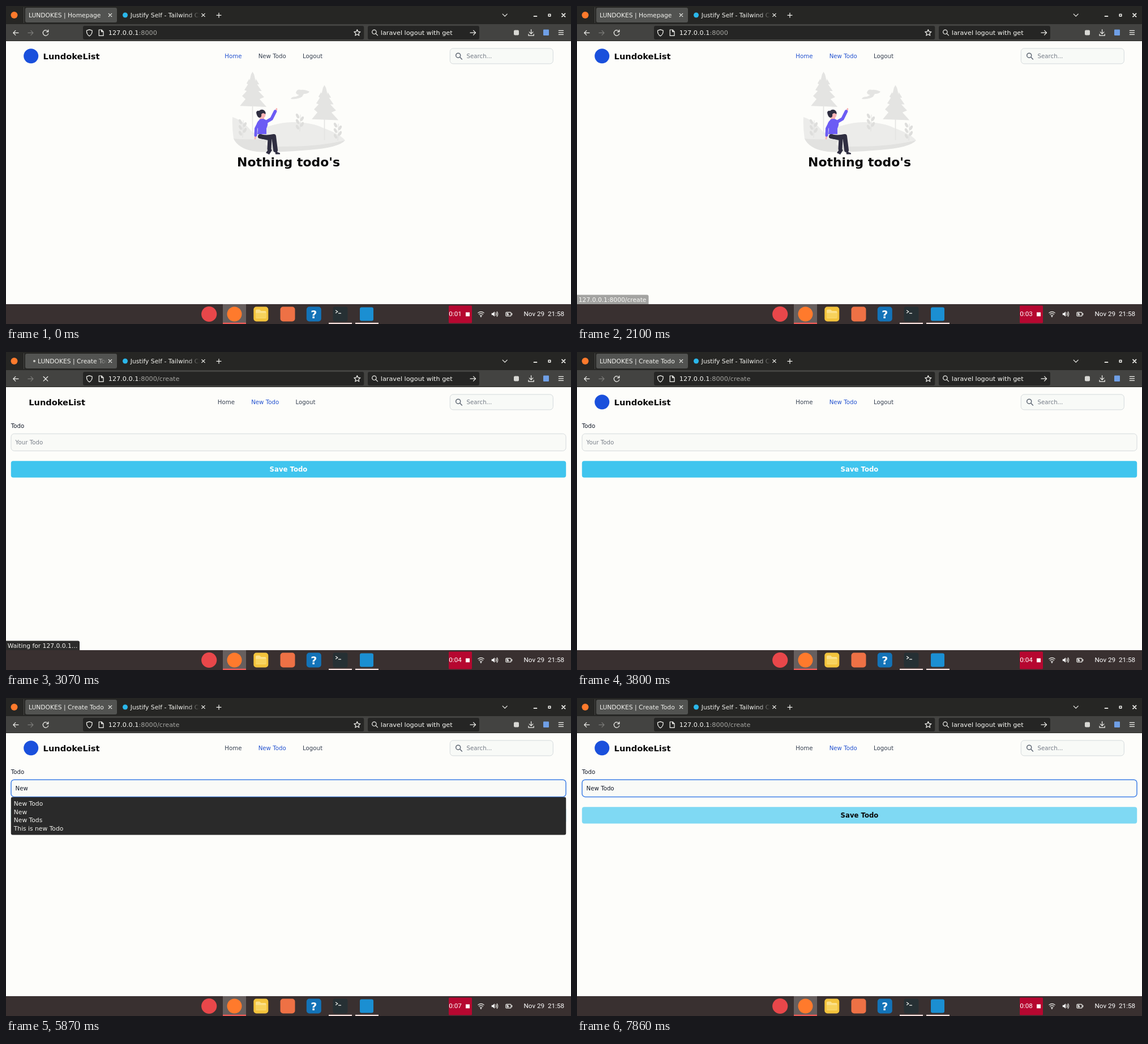
Write an HTML page that moves like this. It is 998 by 561 pixels and loops after 8000 ms.

```html
<!DOCTYPE html>
<html lang="en">
<head>
<meta charset="utf-8">
<title>Todo screencast</title>
<style>
html, body { margin: 0; width: 100%; height: 100%; overflow: hidden; background: #fdfdfa; }
svg { display: block; width: 100%; height: 100%; }
text { font-family: "DejaVu Sans", sans-serif; white-space: pre; }
.panel { font-family: Roboto, sans-serif; font-size: 11.7px; fill: #fff; }
.line { fill: none; stroke: #f4f4f0; stroke-width: 1.2; stroke-linecap: round; stroke-linejoin: round; }
.tab { font-size: 10.72px; fill: #f2f2ee; }
.bar { font-size: 11.25px; fill: #f8f8f4; }
.page { font-size: 10.23px; fill: #374151; }
.bold { font-weight: bold; fill: #080808; }
</style>
</head>
<body>
<svg viewBox="0 0 998 561" preserveAspectRatio="none">
  <defs>
    <linearGradient id="fadeTab"><stop stop-color="#525351" stop-opacity="0"/><stop offset="1" stop-color="#525351"/></linearGradient>
    <linearGradient id="fadeBar"><stop stop-color="#262624" stop-opacity="0"/><stop offset="1" stop-color="#262624"/></linearGradient>
    <clipPath id="tabClip"><rect x="36" y="3" width="143" height="26"/></clipPath>
    <clipPath id="tab2Clip"><rect x="200" y="3" width="142" height="26"/></clipPath>
  </defs>

  <rect width="998" height="561" fill="#fdfdfa"/>

  <g id="nav">
    <circle id="logo" cx="44.2" cy="88.3" r="13" fill="#1a50dc"/>
    <text id="brand" class="bold" y="93.7" font-size="14.61">LundokeList</text>
    <g id="links" class="page">
      <text id="home" x="386.3" y="92.1">Home</text>
      <text id="new" x="445.7" y="92.1">New Todo</text>
      <text id="logout" x="524" y="92.1">Logout</text>
    </g>
    <rect x="784.3" y="74.9" width="182" height="27" rx="5.5" fill="#f8faf7" stroke="#d1d6d8" stroke-width=".9"/>
    <g fill="none" stroke="#5d6672" stroke-width="1.5" stroke-linecap="round"><circle cx="798.7" cy="87.2" r="4"/><path d="M801.8 90.3l3.6 3.7"/></g>
    <text class="page" x="813.5" y="92.1" style="fill:#747b86">Search...</text>
  </g>

  <g id="empty">
    <g id="scene"></g>
    <text class="bold" x="499" y="283" font-size="21.92" text-anchor="middle">Nothing todo's</text>
  </g>

  <g id="form">
    <text class="page" x="8.8" y="134.4" style="fill:#111827">Todo</text>
    <rect id="input" x="9" y="144.2" width="980" height="30.2" rx="5.5" fill="#f9faf7"/>
    <text id="value" class="page" x="16.6" y="163"></text>
    <rect id="caret" y="153" width="1" height="13" fill="#111"/>
    <rect id="save" x="8.8" y="192.2" width="980.4" height="29.4" rx="4"/>
    <text id="saveText" class="bold" x="499" y="211.2" font-size="11.69" text-anchor="middle">Save Todo</text>
    <g id="popup">
      <rect x="8.8" y="174.8" width="980.4" height="66.8" rx="3" fill="#2a2a2a"/>
      <rect id="pick" x="9.5" y="178.6" width="979" height="14.7" fill="#545454"/>
      <g id="rows" class="tab"></g>
    </g>
  </g>

  <g id="status">
    <path id="statusBox" fill="#2b2b2a"/>
    <text id="statusText" class="tab" x="2.8" y="521.8"></text>
  </g>

  <g id="chrome">
    <rect width="998" height="32" fill="#262624"/>
    <rect y="32" width="998" height="30" fill="#434341"/>
    <rect y="61" width="998" height="1" fill="#2b2b28"/>
    <path d="M31.5 2V30" stroke="#484846"/>
    <circle cx="14.5" cy="16" r="6" fill="#ff7a2c"/>
    <rect x="34" y="3" width="162" height="26" rx="3" fill="#525351"/>
    <circle id="throbber" cy="16" r="2.1" fill="#c6c6c2"/>
    <g clip-path="url(#tabClip)"><text id="title" class="tab" y="19.8"></text></g>
    <rect id="titleFade" x="158" y="5" width="21" height="22" fill="url(#fadeTab)"/>
    <circle cx="210.5" cy="16" r="4.5" fill="#2ab7ea"/>
    <g clip-path="url(#tab2Clip)"><text class="tab" x="219.8" y="19.8">Justify Self - Tailwind CSS</text></g>
    <rect x="320" y="5" width="22" height="22" fill="url(#fadeBar)"/>
    <g class="line">
      <path d="M181.3 13.3l5.4 5.4m0-5.4l-5.4 5.4M345.8 13.3l5.4 5.4m0-5.4l-5.4 5.4M372 16.3h8m-4-4v8"/>
      <path d="M877.2 14.2l4 4 4-4"/>
      <path d="M932.5 18.2h5M982 13.3l5.6 5.6m0-5.6l-5.6 5.6" stroke-width="1.7"/>
      <rect x="958.2" y="14.4" width="3.6" height="3.6" stroke-width="1.5"/>
      <path d="M22 47.3h-9.2m4-4l-4 4 4 4"/>
      <path d="M38.8 47.3H48m-4-4l4 4-4 4" stroke="#7c7c79"/>
      <path id="reload" d="M74.4 45.3a4.8 4.8 0 1 0 .3 3.6M74.8 42.2v3.4h-3.4"/>
      <path id="stop" d="M66.2 43.5l7.6 7.6m0-7.6l-7.6 7.6"/>
    </g>
    <g fill="#252524"><rect x="136" y="35" width="496.3" height="24" rx="3"/><rect x="639" y="35" width="197" height="24" rx="3"/></g>
    <g class="line" stroke-width="1.1">
      <path d="M147.3 41.6l4.9 1.8c.2 4.7-1.2 7.6-4.9 9.5-3.7-1.9-5.1-4.8-4.9-9.5z"/>
      <path d="M164.2 42h4.6l3.2 3.2v7.2h-7.8zM168.6 42v3.4h3.4"/>
      <path id="star"/>
      <circle cx="650.4" cy="45.8" r="3.7"/><path d="M653.2 48.6l3.3 3.3"/>
      <path d="M820 47.2h9.6m-4-4l4 4-4 4"/>
      <path d="M927.6 41.5v7.6m-3.3-3.2l3.3 3.3 3.3-3.3M923 49.6v2.6h9.2v-2.6"/>
      <path d="M976.3 43.4h8.2m-8.2 3.5h8.2m-8.2 3.5h8.2"/>
    </g>
    <rect x="897" y="42.5" width="9" height="9" rx="2" fill="#d8d8d4"/>
    <rect x="949" y="41.5" width="10" height="10.5" rx="1" fill="#6f9fe6"/>
    <text class="bar" x="180.8" y="51.2">127.0.0.1<tspan id="path" fill="#a6a6a2"></tspan></text>
    <text class="bar" x="661.8" y="51.2">laravel logout with get</text>
  </g>

  <g id="dock">
    <rect y="526" width="998" height="35" fill="#393030"/>
    <rect x="383" y="526" width="41" height="35" fill="#675f5e"/>
    <rect x="383" y="558.6" width="41" height="2.4" fill="#ec5a56"/>
    <path d="M570 559.8h41M617 559.8h41" stroke="#f4dedb" stroke-width="2.2"/>
    <circle cx="358.7" cy="543.5" r="13.6" fill="#e8474a"/>
    <circle cx="403.5" cy="543.5" r="13" fill="#ff7a2c"/>
    <rect x="437.3" y="530.5" width="26" height="26" rx="5" fill="#f3c33c"/>
    <path d="M441 537.5q0-2 2-2h5l2.5 2.5h7q2 0 2 2v9q0 2-2 2h-14.500q-2 0-2-2z" fill="#fbe08a"/>
    <path d="M441 541.5h18.500v9H441z" fill="#f7d25c"/>
    <rect x="484.5" y="530.5" width="26" height="26" rx="5" fill="#ee7145"/>
    <rect x="530.8" y="530.5" width="26" height="26" rx="5" fill="#1373b8"/>
    <text class="bold" x="543.8" y="550.6" font-size="19" text-anchor="middle" style="fill:#fff">?</text>
    <rect x="577.5" y="530.5" width="26" height="26" rx="4" fill="#263034"/>
    <path class="line" d="M582.5 537l3.400 2.200-3.400 2.200M587.5 542.200h4"/>
    <rect x="625" y="531.5" width="24" height="24" rx="3" fill="#1b8fd2"/>
    <rect x="782" y="528.5" width="41" height="31" rx="1.500" fill="#b60730"/>
    <text id="timer" class="panel" x="782.3" y="547.3"></text>
    <rect x="812" y="540.4" width="7" height="7" fill="#fff"/>
    <g class="line" stroke-width="1.3">
      <path d="M833.800 541.400q5.200-4.200 10.400 0M835.600 543.800q3.400-2.700 6.800 0M837.400 546.100q1.600-1.200 3.200 0"/>
      <path d="M865.300 541q1.700 2.500 0 5M867.300 539.400q2.800 4.100 0 8.200"/>
      <rect x="883" y="540.300" width="9" height="6.600" rx="1"/><path d="M893.600 542.300v2.600"/>
    </g>
    <circle cx="838.900" cy="547.800" r="1.100" fill="#fff"/>
    <path d="M857.800 541.700h2.300l3-2.600v8.800l-3-2.600h-2.300z" fill="#fff"/>
    <path d="M884.500 541.800h3l-1 1.600h2.600l-3.400 3v-2h-1.200z" fill="#fff"/>
    <text class="panel" x="914.500" y="547.300">Nov 29</text>
    <text class="panel" x="957" y="547.300">21:58</text>
  </g>
</svg>
<script>
const $ = id => document.getElementById(id);
const set = (id, attrs) => { for (const k in attrs) $(id).setAttribute(k, attrs[k]); };
const show = (id, on) => { $(id).style.display = on ? '' : 'none'; };
const write = (id, s) => { if ($(id).textContent !== s) $(id).textContent = s; };
const ramp = (t, a, b) => Math.min(1, Math.max(0, (t - a) / (b - a)));
const ease = k => k * k * (3 - 2 * k);
const rgb = s => [1, 3, 5].map(i => parseInt(s.slice(i, i + 2), 16));
const mix = (a, b, k) => {
  const q = rgb(b);
  return `rgb(${rgb(a).map((v, i) => Math.round(v + (q[i] - v) * k))})`;
};
const path = (d, fill) => `<path d="${d}" fill="${fill}"/>`;
const stroke = (d, c, w) => `<path d="${d}" fill="none" stroke="${c}" stroke-width="${w}" stroke-linecap="round" stroke-linejoin="round"/>`;

function tree(x, y, h, base) {
  const tiers = [[.08, .27], [.2, .36], [.36, .55], [.55, .72], [.78, 1]];
  const w = h * .4;
  const right = tiers.map(([a, b], i) => {
    const edge = i ? w * (.3 + i * .175) : w * .22;
    return `L${x + edge * .5} ${y + h * a}L${x + edge} ${y + h * b}`;
  });
  const left = tiers.slice().reverse().map(([a, b], n) => {
    const i = 4 - n, edge = i ? w * (.3 + i * .175) : w * .22;
    return `L${x - edge * .9} ${y + h * (b - .03)}L${x - edge * .5} ${y + h * a}`;
  });
  return path(`M${x} ${y}${right.join('')}${left.join('')}Z`, '#e4e4e2') +
    stroke(`M${x} ${y + h - 4}V${base}`, '#e4e4e2', 1.6);
}

function plant(x, y, h) {
  let s = stroke(`M${x} ${y}q1 ${-h * .5} 1 ${-h}`, '#dededc', .8);
  for (let i = 0; i < 5; i++) {
    const side = i % 2 ? 1 : -1, cy = y - h * (.25 + i * .17), cx = x + side * 4;
    s += `<ellipse cx="${cx}" cy="${cy}" rx="2.4" ry="4.6" transform="rotate(${side * 28} ${cx} ${cy})" fill="#dededc"/>`;
  }
  return s;
}

function buildScene() {
  const dark = '#2f2e41', purple = '#6c5cf4', skin = '#f9b4b4';
  $('scene').innerHTML =
    path('M400 196Q420 202 436 224Q470 206 505 205Q540 205 560 215Q590 226 599 237Q580 247 535 251L445 257Q412 254 402 234Q399 214 400 196Z', '#ececea') +
    path('M402 234Q430 237 470 233Q445 246 470 248Q550 249 599 237Q588 250 535 254Q490 258 450 257.500Q412 255 402 234Z', '#e2e2e0') +
    tree(435.500, 116, 62, 226) + tree(562.500, 139.500, 62, 236) +
    path('M512 153q2-7 9-5q6-1 15 3q-2 4-10 4l-3 5q-8 5-20 4q1-4 9-4l6-3q-5-1-6-4z', '#e4e4e2') +
    plant(519, 221, 29) + plant(586, 237, 29) + plant(418, 232, 30) +
    stroke('M476 187L478 181.500', skin, 2.800) +
    stroke('M441 229L440 234', skin, 2.800) +
    path('M448 192h8v9h-8z', skin) +
    stroke('M457 206L469 199L475.500 186', purple, 5.600) +
    path('M448 200Q456 197 461 203Q464 208 460 216L460 226L444 226Q446 214 443 207Z', purple) +
    stroke('M447 205L441.500 216L441 228', purple, 5) +
    stroke('M449 230Q460 233 473 230L476 254', dark, 8) +
    stroke('M450 230L466 234L465 252', dark, 7) +
    path('M465 251L470 254L465 262L459 259Z', dark) +
    path('M475 254L480 258L484 259.500V261.500H476Z', dark) +
    `<ellipse cx="454.500" cy="192" rx="4" ry="4.800" fill="${skin}"/>` +
    path('M442 188Q443 184 447 185Q451 181 456 184Q460 188 458 191Q454 187 451 191Q452 197 447 197Q443 195 442 188Z', dark);
}

function buildStar() {
  const pts = [...Array(10)].map((_, i) => {
    const a = -Math.PI / 2 + i * Math.PI / 5, r = i % 2 ? 2.7 : 5.8;
    return `${620.3 + r * Math.cos(a)} ${47.4 + r * Math.sin(a)}`;
  });
  set('star', { d: `M${pts.join('L')}Z` });
}

// Timeline, in ms
const HOVER = 1910, CLICK = 2600, SWAP = 2950, LOADED = 3640, FOCUS = 4870;
const KEYS = [5100, 5230, 5360], CHOOSE = 6600;
const BLUE = '#2453d0', GREY = '#374151';

function draw(t) {
  const created = t >= SWAP, loading = t >= CLICK && t < LOADED;
  const logo = !created || t >= LOADED;

  write('timer', '0:0' + (2 + Math.floor((t - 870) / 1000)));

  show('logo', logo);
  set('brand', { x: logo ? 65.6 : 40.2 });
  set('links', { transform: `translate(${logo ? 0 : -12.5})` });
  $('home').style.fill = created ? GREY : BLUE;
  $('new').style.fill = mix(GREY, BLUE, ramp(t, HOVER, HOVER + 120));
  show('empty', !created);
  show('form', created);

  write('title', 'LUNDOKES | ' + (created ? 'Create Todo' : 'Homepage'));
  set('title', { x: loading ? 56 : 40 });
  show('titleFade', loading && created);
  show('throbber', loading);
  set('throbber', { cx: 48 + 4.5 * Math.sin((t - 2992) / 1050 * 2 * Math.PI) });
  show('reload', !loading);
  show('stop', loading);
  write('path', ':8000' + (created ? '/create' : ''));

  const waiting = t >= CLICK;
  write('statusText', waiting ? 'Waiting for 127.0.0.1…' : '127.0.0.1:8000/create');
  set('statusBox', { d: `M0 509.5H${waiting ? 127 : 123.5}q3 0 3 3V526H0Z` });
  const fade = ease(ramp(t, 2045, 2170)) * (1 - ramp(t, LOADED, LOADED + 120));
  set('status', { opacity: fade });

  const typed = KEYS.filter(k => t >= k).length;
  const text = t >= CHOOSE ? 'New Todo' : 'New'.slice(0, typed);
  const focused = t >= FOCUS;
  write('value', text || 'Your Todo');
  $('value').style.fill = text ? '#111827' : '#7a808a';
  set('input', { stroke: focused ? '#3f7fe6' : '#d1d6d8', 'stroke-width': focused ? 1.5 : .9 });
  show('caret', focused && t < 5870 || t >= CHOOSE && t < 6870);
  set('caret', { x: 16.6 + (text ? $('value').getComputedTextLength() : 0) });

  show('popup', typed > 0 && t < CHOOSE);
  set('pick', { opacity: t >= 6330 ? 1 : 0 });

  const hover = ramp(t, 7450, 7620);
  set('save', { fill: mix('#40c5ee', '#7fd9f3', hover) });
  $('saveText').style.fill = mix('#ffffff', '#080808', hover);
}

buildScene();
buildStar();
$('rows').innerHTML = ['New Todo', 'New', 'New Tods', 'This is new Todo']
  .map((s, i) => `<text x="13.8" y="${190 + i * 14.6}">${s}</text>`).join('');

function tick() {
  draw(performance.now() % 8000);
  requestAnimationFrame(tick);
}
tick();
</script>
</body>
</html>
```
